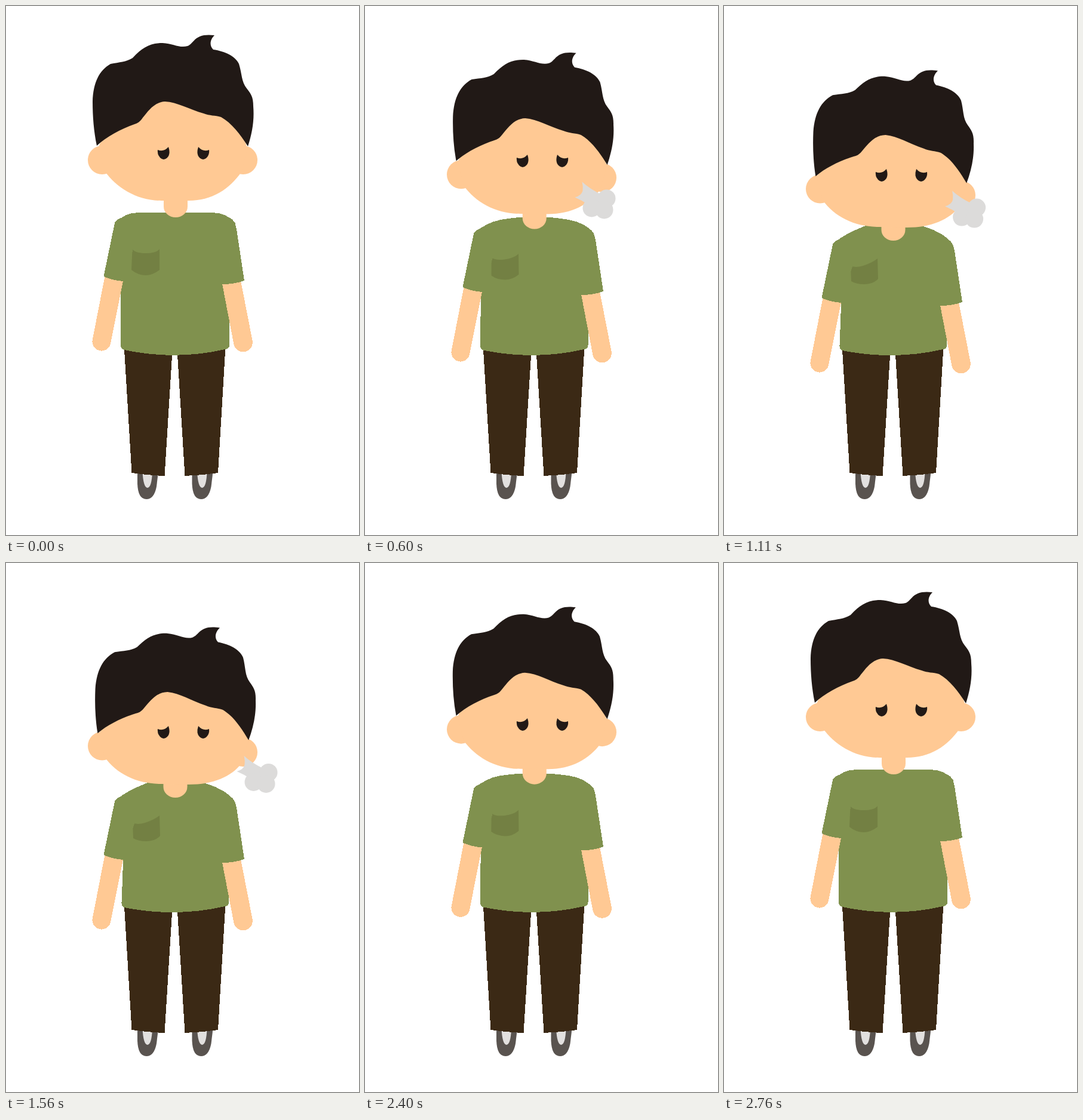
Write an HTML page that moves like this. It is 591 px wide and 886 px high and loops after 3000 ms.

```html
<!DOCTYPE html>
<html lang="en">
<head>
<meta charset="utf-8">
<title>Sigh</title>
<style>
  html, body { margin: 0; width: 100%; height: 100%; overflow: hidden; background: #fff; }
  svg { display: block; width: 100vw; height: 100vh; }
  .skin { fill: #ffc994; }
  .shirt { fill: #80914e; }
  .dark { fill: #211916; }
  .crisp { shape-rendering: crispEdges; }
</style>
</head>
<body>
<svg viewBox="0 0 591 886">
  <defs>
    <g id="shoe">
      <path fill="#59534f" d="M220 780V800Q221 826 235 826Q248 826 252 805L255 780Z"/>
      <path fill="#e2e0df" d="M228.500 780Q230 807 237 807Q244 806 245 780Z"/>
    </g>
    <path id="eye" class="dark" d="M254 241Q264 245 272 236Q276 248 270 254Q264 260 258 254Q253 249 254 241Z"/>
  </defs>

  <use href="#shoe"/>
  <use href="#shoe" x="91.5"/>
  <path class="crisp" fill="#3b2915" d="M197.700 570L210.500 782Q238 786 265.500 787L279 570ZM286.200 570L299.500 787Q327 786 355 782L367.500 570Z"/>

  <path id="torso" class="shirt crisp"/>
  <path id="pocket" fill="#738043"/>
  <g id="arms" class="crisp">
    <path class="skin" d="M166 450L145 558A15.500 15.500 0 0 0 175 566L198 450ZM360 455L381.500 567A15.800 15.800 0 0 0 412.500 560L392 455Z"/>
    <path class="shirt" d="M163.500 453L182.300 362Q189 353 207 352L215 400L197 461Q179 460 163.500 453ZM399 460L386 374Q383 353 365 352L352 410L362 466Q382 466 399 460Z"/>
  </g>

  <path id="neck" class="skin" d="M264 300V336A20 18 0 0 0 304 336V300Z"/>
  <circle id="leftEar" class="skin" cx="161" cy="258" r="24"/>
  <circle id="rightEar" class="skin" cx="397" cy="258" r="24"/>
  <path id="face" class="skin"/>
  <path id="hair" class="dark" d="M152 234C147 210 145 185 145 160C146 128 156 108 175 97C190 94 201 94 212 87C228 70 240 62 262 62C280 63 291 71 304 67C316 62 315 45 349 49C343 55 339 65 347 73C367 76 384 84 390 97C395 113 394 127 403 138C410 147 414 152 414 168C416 192 412 213 405 235C392 215 378 196 360 186C350 183 341 184 331 180C306 173 287 161 266 160C248 161 238 176 229 187C224 194 221 196 215 198C192 206 168 219 152 234Z"/>
  <g id="eyes">
    <use href="#eye"/>
    <use href="#eye" transform="matrix(-1 0 0 1 594 0)"/>
  </g>

  <g id="puff" fill="#dcdbda">
    <path d="M358 290Q371 302 390 311L385 335L368 328Q358 321 346 316Q357 313 359 305Q360 298 358 290Z"/>
    <circle cx="399" cy="318" r="15"/>
    <circle cx="374" cy="334" r="15"/>
    <circle cx="395" cy="337" r="15"/>
  </g>
</svg>

<script>
const LOOP = 3000, STEP = 30;
const el = id => document.getElementById(id);
const clamp = x => Math.min(1, Math.max(0, x));
const ramp = (t, from, to) => clamp((t - from) / (to - from));
const smooth = u => u * u * (3 - 2 * u);

// Upright and slumped outlines of the parts that bend
const bends = {
  torso: [
    'M192 568L192 460L184 362C195 352 205 346 222 346Q284 346 345 346C362 346 376 353 384 364L374 466L374 568Q374 574 367 575Q284 594 198 576Q192 574 192 568Z',
    'M193.5 568L196.5 490L184 396.5C198 386 212 378 232 370Q284 350 337 370C356 376 372 385 382 397L373 500L373 568Q373 574 367 575Q284 594 198 577Q193 575 193.5 568Z'
  ],
  pocket: [
    'M211.5 407Q216 414 234 414Q252 414 257 407L257 442Q246 451 234 451Q221 451 210 442Z',
    'M212 435Q220 439 233 435Q248 430 257 423L258 457Q250 466 235 466Q221 466 213 461Z'
  ],
  face: [
    'M155 236L165 276C185 305 220 326 260 326L306 326C345 326 375 306 394 278L404 238L375 150L190 150Z',
    'M155 288L165 325C186 354 220 370 260 370L306 371C347 371 377 358 394 336L406 298L378 212L193 204Z'
  ]
};

function mix([a, b], p) {
  const ends = b.match(/[\d.]+/g);
  let i = 0;
  return a.replace(/[\d.]+/g, n => +n + (ends[i++] - n) * p);
}

const move = (id, x, y, extra = '') =>
  el(id).setAttribute('transform', `translate(${x} ${y}) ${extra}`);

function draw(t) {
  const rise = ramp(t, 2100, 2760) ** 0.76;
  const slump = smooth(ramp(t, 300, 900)) - smooth(rise);
  const gaze = smooth(ramp(t, 360, 960)) - smooth(ramp(t, 2160, 2760));

  for (const id in bends) el(id).setAttribute('d', mix(bends[id], slump));
  move('arms', 0, 36 * slump);
  move('neck', -0.5 * slump, 39 * slump);
  move('leftEar', 0, 48.5 * slump);
  move('rightEar', 0, 59 * slump);
  move('hair', 1.3 * slump, 56.5 * slump, `rotate(${2.4 * slump} 279 234)`);
  move('eyes', 0, 37 * gaze);

  const drift = Math.min(t, 1680) - 450;
  move('puff', 0.0365 * drift, 0.0297 * drift);
  el('puff').setAttribute('opacity', Math.min(ramp(t, 300, 420), 1 - ramp(t, 1590, 1800)));
}

const start = performance.now();
function tick() {
  const t = (performance.now() - start) % LOOP;
  draw(Math.floor(t / STEP) * STEP);
  requestAnimationFrame(tick);
}
tick();
</script>
</body>
</html>
```
